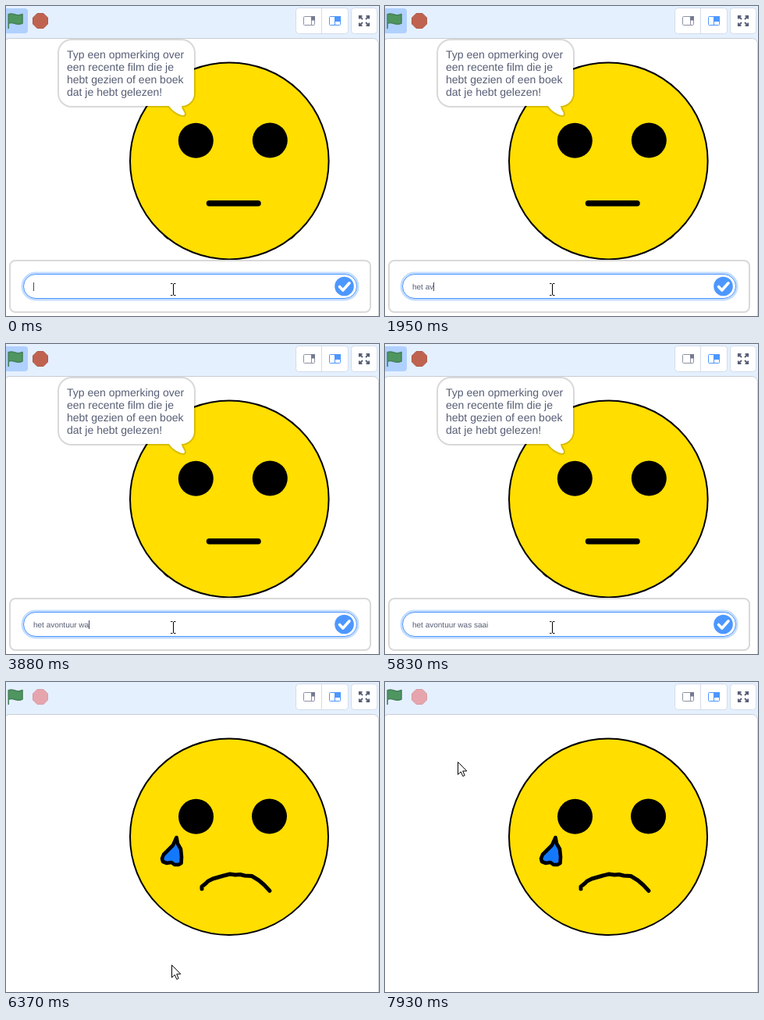
Recreate the animation shown at these times as an HTML page. Size 478 by 397 pixels, loop 8000 ms.

```html
<!DOCTYPE html>
<html lang="nl">
<head>
<meta charset="utf-8">
<style>
  html, body { margin: 0; width: 100%; height: 100%; overflow: hidden; background: #e5f0ff; }
  svg { display: block; }
  text { font-family: "Liberation Sans", Arial, sans-serif; fill: #575e75; white-space: pre; text-rendering: geometricPrecision; }
  .pen { fill: none; stroke: #000; stroke-linecap: round; stroke-linejoin: round; }
  .button { fill: #fff; stroke: #d3dcea; }
</style>
</head>
<body>
<svg width="478" height="397" viewBox="0 0 478 397">
  <!-- toolbar -->
  <rect id="flagGlow" x="-6" y="3" width="34" height="32" rx="4" fill="#b0d0ff"/>
  <path d="M3.2 10.5V28.5M3.2 11C9 7 13 15 21 10.5V22C13 26.5 9 18.500 3.200 22.500" fill="#4f9560" stroke="#45815a" stroke-width="1.6" stroke-linecap="round" stroke-linejoin="round"/>
  <path id="stop" d="M40 9.500H48L53.500 15V23L48 28.500H40L34.500 23V15Z" stroke-linejoin="round"/>
  <rect class="button" x="371.500" y="2.500" width="67" height="33" rx="4"/>
  <path d="M404.500 3V35" stroke="#d3dcea"/>
  <rect class="button" x="442.500" y="2.500" width="33" height="33" rx="4"/>
  <g fill="none" stroke="#8d92a3">
    <rect x="381.500" y="13.500" width="14" height="11" rx="1"/>
    <path d="M391.500 14V24"/>
    <path d="M391 13H396V18.500H391Z" fill="#757b90" stroke="none"/>
  </g>
  <g fill="none" stroke="#4c97ff">
    <rect x="414.500" y="13.500" width="14" height="11" rx="1"/>
    <path d="M421.500 14V24"/>
    <path d="M421 13H429V20H421Z" fill="#4c97ff" stroke="none"/>
  </g>
  <path d="M453 13L457 17M465 13L461 17M453 25L457 21M465 25L461 21M452.800 16.500V12.800H456.500M461.500 12.800H465.200V16.500M452.800 21.500V25.200H456.500M461.500 25.200H465.200V21.500" fill="none" stroke="#575e75" stroke-width="1.800"/>

  <rect x="-2.500" y="41.500" width="480" height="400" rx="7" fill="#fff" stroke="#c9ccd3"/>

  <g id="neutral">
    <ellipse cx="286.300" cy="198.400" rx="127.300" ry="126" fill="#ffde00" stroke="#000" stroke-width="2"/>
    <path class="pen" d="M203 294L207 297.500M369.500 294L365.500 297.500" stroke-width="2"/>
    <circle cx="243.300" cy="172.300" r="22.500"/>
    <circle cx="338.300" cy="172" r="22.500"/>
    <path class="pen" d="M260.500 252.800H323" stroke-width="7.500"/>
    <path d="M84 44H225A16 16 0 0 1 241 60V112A16 16 0 0 1 225 128C225 132 229 136 229 138A2 2 0 0 1 227 140C224 140 214 136 209 128H84A16 16 0 0 1 68 112V60A16 16 0 0 1 84 44Z" fill="#fff" stroke="#000" stroke-opacity=".15" stroke-width="4" paint-order="stroke"/>
    <text font-size="14">
      <tspan x="78" y="67">Typ een opmerking over</tspan>
      <tspan x="78" y="83">een recente film die je</tspan>
      <tspan x="78" y="99">hebt gezien of een boek</tspan>
      <tspan x="78" y="115">dat je hebt gelezen!</tspan>
    </text>
  </g>

  <g id="sad">
    <ellipse cx="286" cy="198.200" rx="127" ry="125.800" fill="#ffde00" stroke="#000" stroke-width="2"/>
    <circle cx="243.500" cy="172.300" r="22.500"/>
    <circle cx="337.500" cy="172" r="22.500"/>
    <path class="pen" d="M251 265L251 262L256 258L259 255L265 252L272 250L279 248L287 246L294 247L300 246.500L306 248L315 248.500L324 254L331 260L338 267.500" stroke-width="5"/>
    <path class="pen" d="M218.500 199L214 209L208 215L202 221L200 226L201 230L206 232L212 231L216 234L221 234L224.500 232L225 224L224 214L220 207Z" style="fill:#1478ff" stroke-width="4.600"/>
  </g>

  <g id="prompt">
    <rect x="5" y="326" width="462" height="66" rx="7" fill="#fff" stroke="#d9d9d9" stroke-width="2"/>
    <rect x="21" y="342" width="430" height="34" rx="17" fill="none" stroke="#c3dcff" stroke-width="3"/>
    <rect x="22.500" y="343.500" width="427" height="31" rx="15.500" fill="#fff" stroke="#4c97ff"/>
    <circle cx="433.500" cy="359" r="12.300" fill="#4c97ff"/>
    <path d="M427.500 359.500L431.800 364L440 354.800" fill="none" stroke="#fff" stroke-width="3.600" stroke-linecap="round" stroke-linejoin="round"/>
    <text id="answer" x="35" y="363" font-size="10"></text>
    <rect id="caret" y="354" width="1" height="11" fill="#444a5c"/>
    <path d="M211 355.500H213.500M215 355.500H217.500M214.500 356V370M211 370.500H213.500M215 370.500H217.500" stroke="#000" fill="none"/>
  </g>
  <path id="arrow" d="M.5 .5V16.500L4.200 13L6.800 18.700L9.200 17.600L6.700 12H11.800Z" fill="#fff" stroke="#000"/>
</svg>
<script>
  const LOOP = 8000, SUBMIT = 6290, REACT = 6370;
  const ANSWER = "het avontuur was saai";
  const KEY_TIMES = [
    950, 1120, 1290, 1460, 1630, 1950,
    2260, 2450, 2650, 2850, 3050, 3250,
    3420, 3650, 3880, 4030, 4230, 4430,
    4750, 4900, 5280
  ];
  const MOUSE_START = 7300, MOUSE_STEP = 105;
  const MOUSE_PATH = [[212, 362], [228, 371], [258, 352], [269, 305], [246, 236], [189, 168], [126, 118], [93, 102]];

  const el = id => document.getElementById(id);
  const [flagGlow, stop, neutral, sad, prompt, answer, caret, arrow] =
    ["flagGlow", "stop", "neutral", "sad", "prompt", "answer", "caret", "arrow"].map(el);
  const show = (node, on) => node.style.display = on ? "" : "none";

  function draw(t) {
    const asking = t < SUBMIT, running = t < REACT;
    show(prompt, asking);
    show(arrow, !asking);
    show(neutral, running);
    show(sad, !running);
    show(flagGlow, running);
    stop.setAttribute("fill", running ? "#bf6350" : "#e6a5ad");
    stop.setAttribute("stroke", running ? "#b0594a" : "#d99aa4");

    if (asking) {
      answer.textContent = ANSWER.slice(0, KEY_TIMES.filter(k => k <= t).length);
      const width = answer.textContent ? answer.getComputedTextLength() : 0;
      caret.setAttribute("x", Math.round(35 + width));
      show(caret, t < 240 || t >= 780 && t < 5830);
    } else {
      const step = t < MOUSE_START ? 0 : 1 + Math.floor((t - MOUSE_START) / MOUSE_STEP);
      const [x, y] = MOUSE_PATH[Math.min(step, MOUSE_PATH.length - 1)];
      arrow.setAttribute("transform", `translate(${x} ${y})`);
    }
  }

  const start = performance.now();
  function tick() {
    draw((performance.now() - start) % LOOP);
    requestAnimationFrame(tick);
  }
  tick();
</script>
</body>
</html>
```
